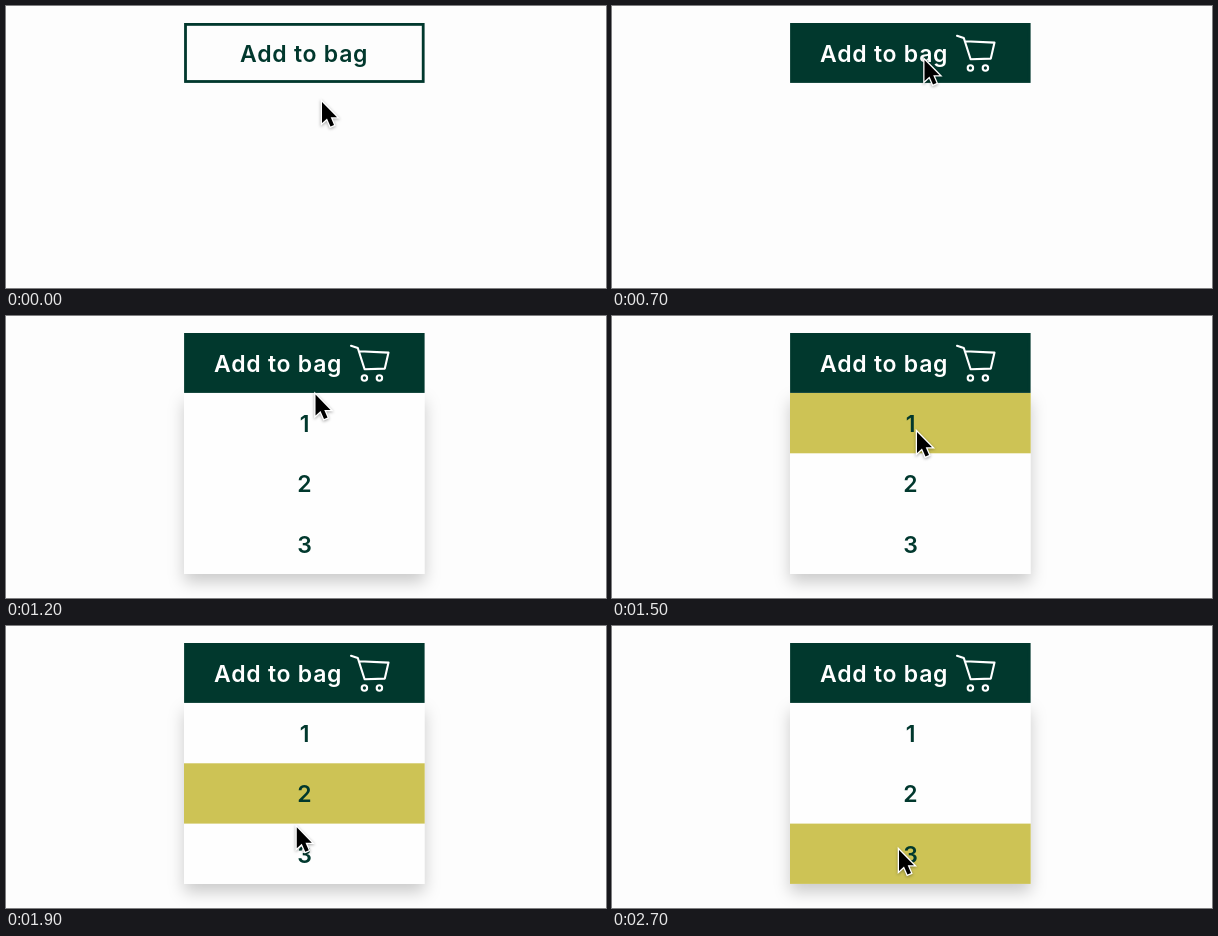
These frames come from a looping animation (600x282 px, 2900 ms). An HTML page:

```html
<!DOCTYPE html>
<html lang="en">
<head>
<meta charset="utf-8">
<title>Add to bag</title>
<style>
  html, body { margin: 0; width: 100%; height: 100%; overflow: hidden; background: #fdfdfd; }
  svg { display: block; width: 600px; height: 282px; }
  text { font: 600 23px Inter, sans-serif; fill: #01382d; }
  #label { letter-spacing: .75px; }
  #menu text { text-anchor: middle; }
  #panel { filter: drop-shadow(0 8px 8px rgba(0, 0, 0, .2)); }
  #pointer { filter: drop-shadow(0 1.5px 1.5px rgba(0, 0, 0, .35)); }
</style>
</head>
<body>
<svg viewBox="0 0 600 282">
  <g id="menu">
    <rect id="panel" x="178" y="77" width="240.7" height="181" fill="#fefefe"/>
    <rect id="highlight" x="178" width="240.7" height="60.3" fill="#cdc355"/>
  </g>
  <rect id="button" x="179.5" y="18.4" width="237.7" height="57.1" stroke="#01382d" stroke-width="2.8"/>
  <text id="label" y="55.7">Add to bag</text>
  <g id="cart" fill="none" stroke="#fff" stroke-width="2.1" stroke-linecap="round" stroke-linejoin="round">
    <path d="M345 29.8L351.8 32L358.6 53.2L378.8 52.6L382.5 36.6L353.2 35.3"/>
    <circle cx="358.4" cy="62" r="2.7"/>
    <circle cx="373.4" cy="62" r="2.7"/>
  </g>
  <path id="pointer" d="M0 0V21L5 16.5L8.5 24.5L12 23L8.7 15.3H15Z" stroke="#fff" stroke-width="2.6" paint-order="stroke"/>
</svg>
<script>
const LOOP = 2900, STEP = 100, START = 400;
const TOP = 77, ROW = 60.3, ROWS = 3;
const GREEN = "#01382d", PAPER = "#fdfdfd";
const $ = id => document.getElementById(id);

// Places where the pointer rests or turns: time, x, y
const stops = [
  [0, 316, 96], [650, 312.5, 54], [960, 312.5, 54],
  [1500, 305, 116], [2100, 287, 224], [LOOP, 287, 224]
];

const clamp = v => Math.min(1, Math.max(0, v));
const easeOut = v => 1 - (1 - clamp(v)) ** 2;
const smooth = v => v ** 3 * (v * (6 * v - 15) + 10);

function set(id, attrs) {
  for (const name in attrs) $(id).setAttribute(name, attrs[name]);
}

function tip(t) {
  const i = stops.findIndex(s => s[0] > t);
  const [t0, x0, y0] = stops[i - 1], [t1, x1, y1] = stops[i];
  const k = smooth((t - t0) / (t1 - t0));
  return [x0 + (x1 - x0) * k, y0 + (y1 - y0) * k];
}

function draw(now) {
  const step = Math.floor((now % LOOP) / STEP) * STEP;
  const hover = step >= START;
  const t = hover ? step : 0;
  // The highlight trails the pointer by one step
  const row = Math.floor((tip(Math.max(0, t - STEP))[1] - TOP) / ROW);
  const open = easeOut((t - 870) / 300);

  set("button", { fill: hover ? GREEN : PAPER });
  $("label").style.fill = hover ? "#fff" : GREEN;
  set("label", { x: 234 - 26 * easeOut((t - 250) / 300) });
  set("cart", { opacity: clamp((t - 400) / 250) });
  set("menu", { opacity: open });
  set("highlight", { y: TOP + ROW * row, opacity: row < 0 ? 0 : 1 });
  set("pointer", { transform: `translate(${tip(t)})` });
}

for (let i = 0; i < ROWS; i++) {
  const digit = document.createElementNS("http://www.w3.org/2000/svg", "text");
  digit.textContent = i + 1;
  $("menu").append(digit);
  digit.setAttribute("x", 298.5);
  digit.setAttribute("y", TOP + ROW * i + 39);
}

const start = performance.now();
function tick() {
  draw(performance.now() - start);
  requestAnimationFrame(tick);
}
tick();
</script>
</body>
</html>
```
